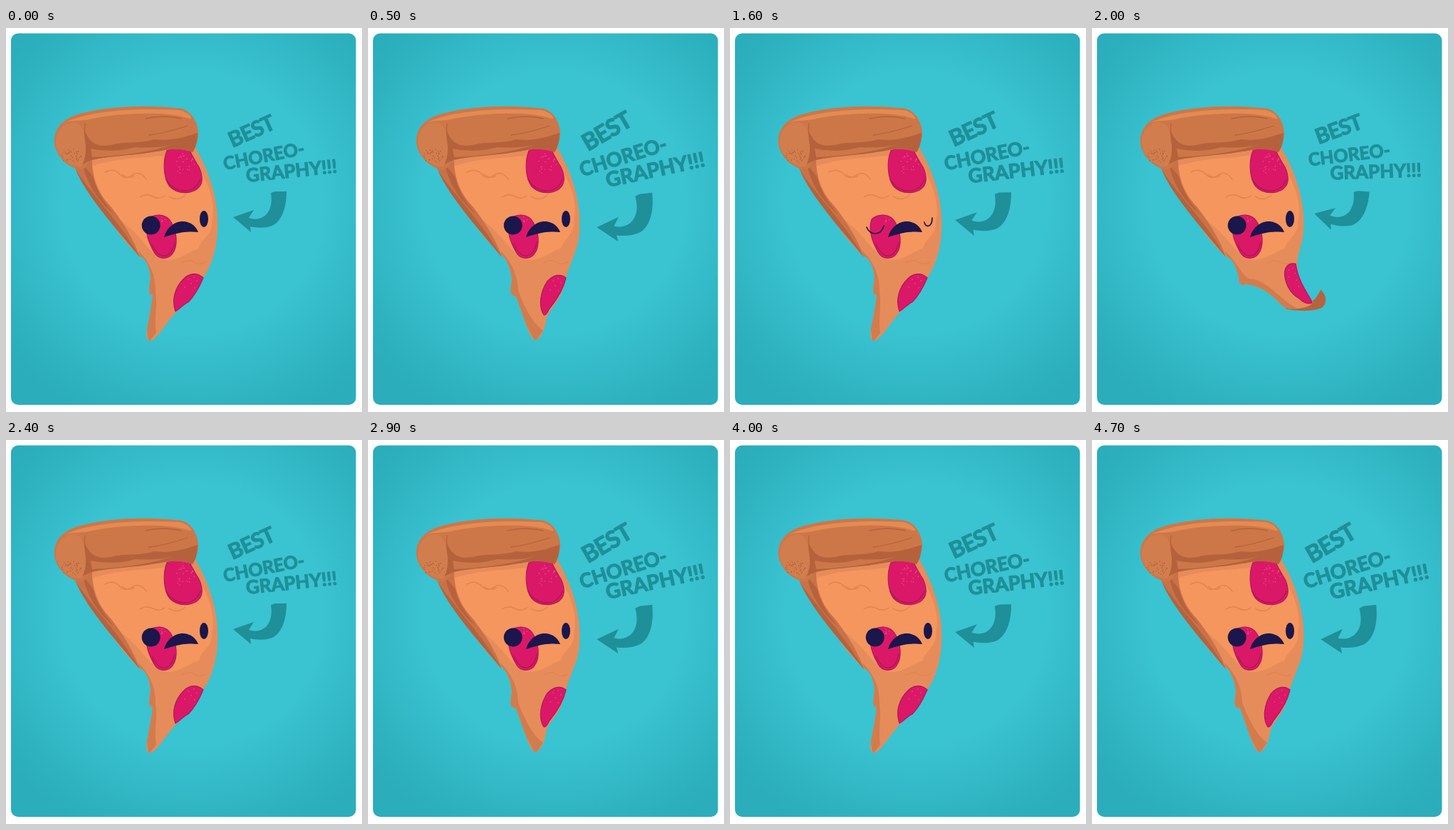
Recreate the animation shown at these times as an HTML page. Size 500 by 538 pixels, loop 4.8 s.

```html
<!DOCTYPE html>
<html lang="en">
<head>
<meta charset="utf-8">
<title>Dancing pizza</title>
<style>
html, body { margin: 0; width: 100%; height: 100%; overflow: hidden; background: #fefefe; }
svg { display: block; width: 100vw; height: 100vh; }
text { font: 700 26px Lato, "Open Sans", sans-serif; stroke-width: 1.1; stroke-linejoin: round; }
.line { fill: none; stroke-linecap: round; stroke-linejoin: round; }
</style>
</head>
<body>
<svg viewBox="0 0 500 538">
  <defs>
    <radialGradient id="sea" gradientUnits="userSpaceOnUse" cx="262" cy="245" r="335">
      <stop offset=".55" stop-color="#3ac3d1"/>
      <stop offset=".85" stop-color="#2fb3c1"/>
      <stop offset="1" stop-color="#2badbb"/>
    </radialGradient>
    <clipPath id="inside"><path data-part="body"/></clipPath>
  </defs>
  <rect x="7" y="7.500" width="484.500" height="520.500" rx="10" fill="url(#sea)"/>

  <g id="note" fill="#1f8f99" stroke="#1f8f99">
    <text transform="translate(318 168) rotate(-24)" style="font-size:30px;letter-spacing:-1px">BEST</text>
    <text transform="translate(307 199) rotate(-11)" style="font-size:25px">CHOREO-</text>
    <text transform="translate(338 216) rotate(-6)">GRAPHY!!!</text>
    <path stroke="none" d="M372 231L378 229L394 229C394 250 388 270 374 277C363 281 351 280 343 278L344 286L319 265L348 255L341 266C357 272 377 262 372 231Z"/>
  </g>

  <path data-part="fold" fill="#b5643d"/>
  <path data-part="body" fill="#e68c5a"/>
  <g clip-path="url(#inside)">
    <path data-part="shade" fill="#d27c4e"/>
    <path fill="#f5965e" d="M121 187C165 178 210 176 262 181C282 212 296 242 289 271C292 288 273 296 271 309C258 312 246 325 226 325C207 322 193 298 181 287C166 271 150 264 145 248C130 232 122 209 121 187Z"/>
    <path fill="#e68c5a" d="M119 180L264 170L269 186Q225 176 202 181Q160 182 121 193Z"/>
  </g>
  <path fill="#c97147" d="M94 190L121 181C120 211 130 233 147 250C158 264 179 293 188 321C152 278 114 236 94 190Z"/>
  <path fill="#b5623d" d="M98 199C122 235 157 268 188 321C152 278 114 236 98 199ZM108 191L122 208Q128 234 152 261Q117 233 108 191Z"/>
  <g class="line" stroke="#e28450" stroke-width="1.500">
    <path d="M139 202Q149 196 158 203Q167 214 177 206Q188 199 197 212M188 237Q197 231 206 236T223 235M229 236Q241 244 252 234M163 205Q172 212 180 207M247 329Q257 323 264 328T281 328"/>
  </g>

  <g fill="#db1868" stroke="#b31658" stroke-width="1.200">
    <path d="M226 172C220 186 221 211 230 222C241 234 264 233 272 222C278 214 275 200 268 190C262 180 259 174 258 171C248 168 235 168 226 172Z"/>
    <path d="M199 268C207 260 225 259 232 272C240 285 242 305 234 316C228 325 214 325 208 314C202 303 193 285 199 268Z"/>
    <path data-part="meat"/>
  </g>
  <g class="line" stroke="#b31658" stroke-width="1.500">
    <path d="M225 212Q235 229 253 228Q267 227 273 212M205 303Q213 321 224 319Q234 316 237 300"/>
  </g>
  <g class="line" stroke="#ee5a92" stroke-width="1.300">
    <path id="dots"/>
    <path data-part="spots"/>
  </g>

  <path fill="#cd7748" d="M68 163C66 139 82 125 108 119C150 108 205 108 244 112.500C262 115 271 136 270 150C268 162 266 168 262 174C240 166 225 171 205 174C175 179 145 179 120 185C114 187 116 195 107 198C95 199 73 187 68 163Z"/>
  <path fill="#b5623c" d="M110 143C118 161 126 167 147 164C165 158 188 163 208 156C232 159 250 153 269 147C269 160 266 168 262 174C240 166 225 171 205 174C175 179 145 179 120 185L107 191Q112 178 110 143Z"/>
  <path fill="#cd7748" d="M119 169Q150 176 182 167Q214 169 235 163Q190 178 121 181Z"/>
  <path fill="#e48b53" d="M80 134C108 118 170 111 244 115C257 118 264 128 258 127C224 115 150 120 117 128C102 131 91 128 80 134Z"/>
  <path fill="#d27d4d" d="M70 164C69 146 80 133 94 132C106 133 109 143 110 153C114 170 112 183 106 194C91 195 75 183 70 164Z"/>
  <path class="line" stroke="#b5623c" stroke-width="1.300" d="M111 134Q108 150 118 164M196 127Q222 121 246 127M201 150Q225 147 255 137"/>
  <path id="specks" class="line" stroke="#a95a38" stroke-width="1.300"/>

  <g fill="#1b164b">
    <path d="M222 293C225 281 236 270 250 271C260 272 267 278 270 286C255 284 239 287 222 293Z"/>
    <g id="open"><circle cx="203.700" cy="276.500" r="13"/><ellipse cx="278" cy="267.500" rx="6" ry="11.500"/></g>
    <path id="shut" class="line" stroke="#1b164b" stroke-width="1.700" d="M192 279C196 291 212 292 216 277M273 272C274 280 284 280 284 266"/>
  </g>
</svg>
<script>
const $ = id => document.getElementById(id);
const upper = "M118 178L266 168C284 198 300 240 297 285";
const side = "C150 285 120 235 118 178Z";

// Swing poses, right to left; each part keeps the same path structure.
const poses = [
  { at: -0.866,
    body: "C296 305 287 318 287 335C286 355 292 370 303 387C298 395 288 400 268 399C256 393 245 369 214 361C209 364 206 360 206 354C205 342 198 322 188 320",
    shade: "M186 312C205 328 211 350 222 354C242 358 258 383 282 397L268 404L205 366Z",
    meat: "M285 333C278 331 271 333 268 343C266 357 272 374 285 382C289 386 296 389 302 386C300 375 288 360 285 333Z",
    spots: "M274 341h.1M280 338h.1M282 346h.1M276 350h.1M283 355h.1M287 363h.1",
    fold: "M303 387L310 376C317 383 318 392 311 398C300 403 280 402 266 399C282 397 295 393 303 387Z" },
  { at: 0,
    body: "C296 310 285 325 278 350C273 380 258 390 251 405C249 422 242 437 235 437C228 437 222 415 208 376C198 375 200 368 202 352C201 340 196 325 188 318",
    shade: "M186 312C203 328 211 350 211 368C219 388 230 413 246 424L235 440L195 366Z",
    meat: "M278 350C271 344 260 345 251 356C242 370 239 390 247 402C251 403 253 396 255 393C264 382 274 368 278 350Z",
    spots: "M260 354h.1M267 351h.1M263 361h.1M271 357h.1M256 367h.1M267 368h.1",
    fold: "M235 436L235 436C235 436 235 436 235 436C235 436 235 436 235 436C235 436 235 436 235 436Z" },
  { at: 0.5,
    body: "C296 310 288 335 277 350C265 375 250 385 240 397C225 412 212 437 203 438C190 438 203 410 206 373C199 377 201 364 203 350C202 335 196 322 188 320",
    shade: "M186 312C203 328 211 350 210 370C213 389 208 405 211 427L200 441L192 366Z",
    meat: "M277 350C270 343 258 342 249 352C238 363 232 380 238 397C244 394 250 386 256 384C265 375 272 362 277 350Z",
    spots: "M256 352h.1M264 349h.1M260 358h.1M268 354h.1M251 363h.1M265 364h.1",
    fold: "M203 436L203 436C203 436 203 436 203 436C203 436 203 436 203 436C203 436 203 436 203 436Z" },
  { at: 1,
    body: "C296 310 286 332 270 350C258 372 230 388 206 400C190 406 165 400 150 388C158 386 180 378 196 366C194 366 196 356 200 346C200 335 196 325 188 319",
    shade: "M186 312C203 328 208 346 204 366C196 378 176 386 162 393L145 388L185 360Z",
    meat: "M270 350C262 342 248 346 238 354C222 364 212 382 212 397C222 393 228 388 236 386C250 380 262 366 270 350Z",
    spots: "M247 354h.1M255 351h.1M248 361h.1M258 357h.1M239 364h.1M248 370h.1",
    fold: "M150 388L145 376C138 384 138 398 148 402C165 408 190 407 206 400C180 396 160 392 150 388Z" }
];

// Rotation, scale and shift of the lettering for each step of its beat.
const beat = [[0, 1, 0, 0], [2, 1, 0, 0], [4, 1, 0, 0], [3.7, 1, 0, 0], [-.5, 1.055, 0, -2], [-6.2, 1.1, -3, -3]];

function mix(a, b, t) {
  const ends = b.match(/[\d.]+/g);
  let i = 0;
  return a.replace(/[\d.]+/g, n => (+n + (ends[i++] - n) * t).toFixed(2));
}

let seed = 7;
const rnd = () => (seed = seed * 16807 % 2147483647) / 2147483647;
function scatter(count, cx, cy, rx, ry) {
  let d = "";
  while (count--) {
    const a = rnd() * 6.283, r = Math.sqrt(rnd());
    d += `M${cx + rx * r * Math.cos(a)} ${cy + ry * r * Math.sin(a)}h.1`;
  }
  return d;
}
$("dots").setAttribute("d", scatter(24, 250, 191, 15, 16) + scatter(6, 222, 269, 7, 5));
$("specks").setAttribute("d", scatter(38, 91, 179, 15, 10));

const parts = document.querySelectorAll("[data-part]");

function draw(now) {
  const step = Math.floor(now % 4800 / 100);
  const w = Math.cos((step - 2) * Math.PI / 6);
  const i = w < 0 ? 0 : w < .499 ? 1 : 2;
  const a = poses[i], b = poses[i + 1], t = (w - a.at) / (b.at - a.at);
  parts.forEach(el => {
    const part = el.dataset.part, d = mix(a[part], b[part], t);
    el.setAttribute("d", part === "body" ? upper + d + side : d);
  });
  const [turn, size, dx, dy] = beat[step % 6];
  $("note").setAttribute("transform",
    `translate(${386 + dx} ${167 + dy}) rotate(${turn}) scale(${size}) translate(-386 -167)`);
  const blink = step === 15 || step === 16;
  $("open").style.display = blink ? "none" : "";
  $("shut").style.display = blink ? "" : "none";
}

const start = performance.now();
function tick() {
  draw(performance.now() - start);
  requestAnimationFrame(tick);
}
tick();
</script>
</body>
</html>
```
